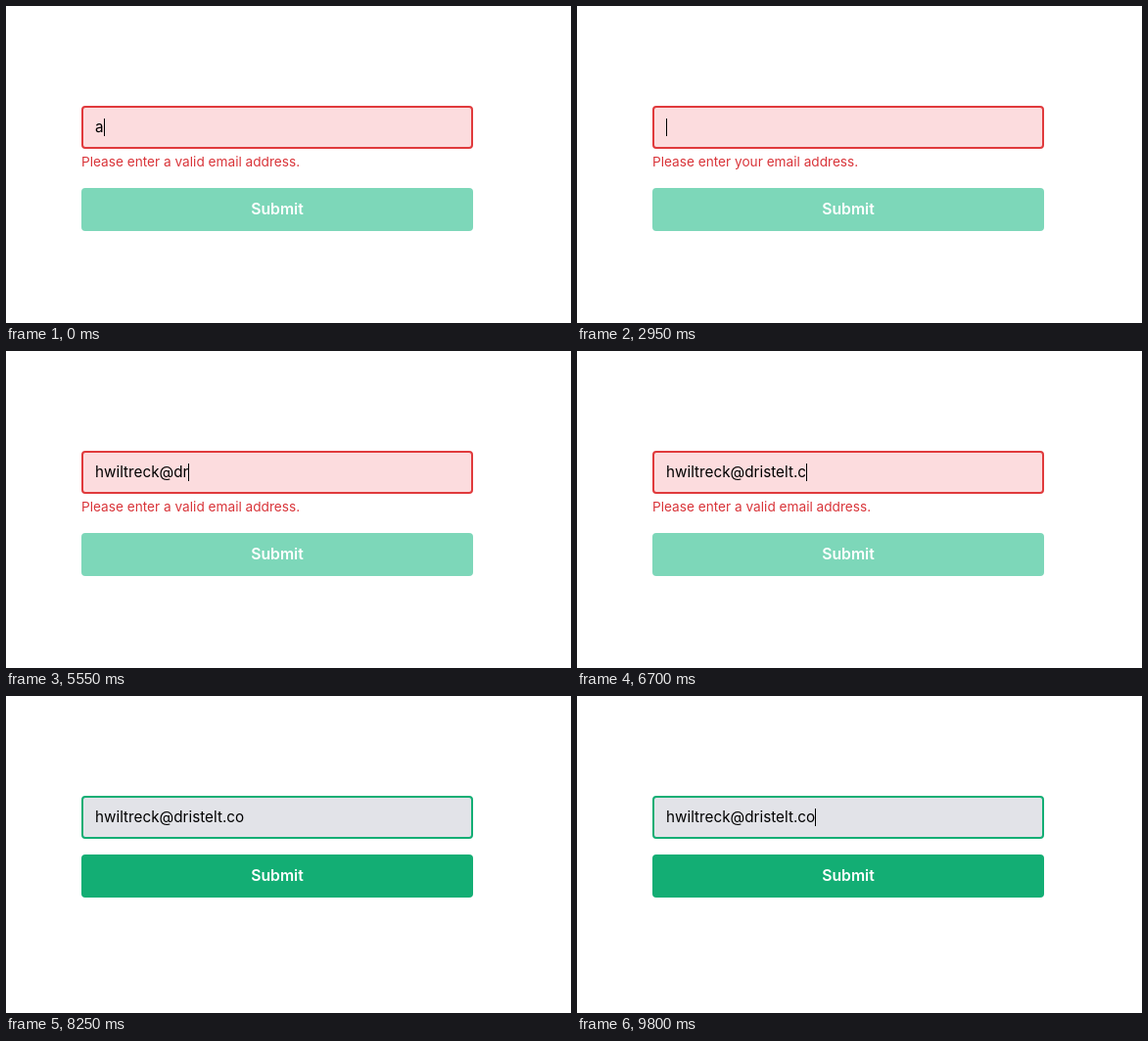
Write an HTML page that moves like this. It is 577 by 324 pixels and loops after 10000 ms.

```html
<!DOCTYPE html>
<html lang="en">
<head>
<meta charset="utf-8">
<title>Email field validation</title>
<style>
  html, body {
    margin: 0;
    width: 100%;
    height: 100%;
    overflow: hidden;
    background: #fff;
    font-family: Inter, Roboto, sans-serif;
  }
  .field, .submit, .error, .value { position: absolute; white-space: pre; }
  .field, .submit {
    left: 77px;
    width: 400px;
    height: 44px;
    box-sizing: border-box;
    border-radius: 4px;
  }
  .field { top: 102px; border: 2px solid #e03a3c; background: #fcdcde; }
  .value {
    left: 91px;
    top: 102px;
    height: 44px;
    font-size: 15.25px;
    line-height: 44px;
    color: #000;
  }
  .value mark { color: inherit; background: #a4c6ee; }
  .caret::after {
    content: "";
    position: absolute;
    left: 100%;
    top: 13px;
    width: 1px;
    height: 18px;
    background: #000;
  }
  .misspelt::before {
    content: "";
    position: absolute;
    left: 0;
    right: 0;
    top: 29px;
    height: 2px;
    background: radial-gradient(circle at 1px 1px, #e0353c 0.8px, transparent 1.2px) 0 0 / 3px 2px;
  }
  .error {
    left: 77px;
    top: 149px;
    font-size: 13.65px;
    line-height: 20px;
    color: #d9353a;
  }
  .submit {
    top: 186px;
    background: #7dd7b9;
    color: #fff;
    font-size: 15.75px;
    font-weight: 600;
    line-height: 44px;
    text-align: center;
  }
  .valid .field { border-color: #13ae74; background: #e2e3e8; }
  .valid .error { display: none; }
  .valid .submit { top: 162px; background: #13ae74; }
</style>
</head>
<body>
<div class="field"></div>
<div class="value"><span></span><mark></mark></div>
<div class="error"></div>
<div class="submit">Submit</div>
<script>
  const LOOP = 10000;
  const DRAFT = 'asfasd';
  const EMAIL = 'hwiltreck@dristelt.co';

  // Time at which each letter appears
  const draftKeys = [0, 50, 100, 150, 250, 350];
  const emailKeys = [3550, 3650, 3950, 4000, 4100, 4250, 4350, 4450, 4650, 4950,
    5450, 5550, 5650, 5750, 5900, 6050, 6200, 6350, 6400, 6700, 6750];
  const CLEARED = 1950;
  const VALID = 6750;
  const caretOff = [[750, 1950], [2450, 2950], [3450, 3550], [5350, 5450],
    [7250, 7750], [8250, 8750], [9250, 9800]];

  const value = document.querySelector('.value');
  const [plain, marked] = value.children;
  const error = document.querySelector('.error');

  const typed = (keys, t) => keys.filter(k => k <= t).length;

  function setText(el, text) {
    if (el.textContent !== text) el.textContent = text;
  }

  function render(t) {
    const drafting = t < CLEARED;
    const text = drafting
      ? DRAFT.slice(0, typed(draftKeys, t))
      : EMAIL.slice(0, typed(emailKeys, t));

    // The selection grows leftwards, one letter every 50 ms
    const selected = drafting
      ? Math.max(0, Math.min(DRAFT.length, Math.floor((t - 1150) / 50)))
      : 0;
    const split = text.length - selected;

    setText(plain, text.slice(0, split));
    setText(marked, text.slice(split));
    setText(error, text
      ? 'Please enter a valid email address.'
      : 'Please enter your email address.');

    value.classList.toggle('caret', !caretOff.some(([a, b]) => t >= a && t < b));
    value.classList.toggle('misspelt', drafting && t >= 750);
    document.body.classList.toggle('valid', t >= VALID);
  }

  const start = performance.now();
  function tick() {
    render((performance.now() - start) % LOOP);
    requestAnimationFrame(tick);
  }
  tick();
</script>
</body>
</html>
```
